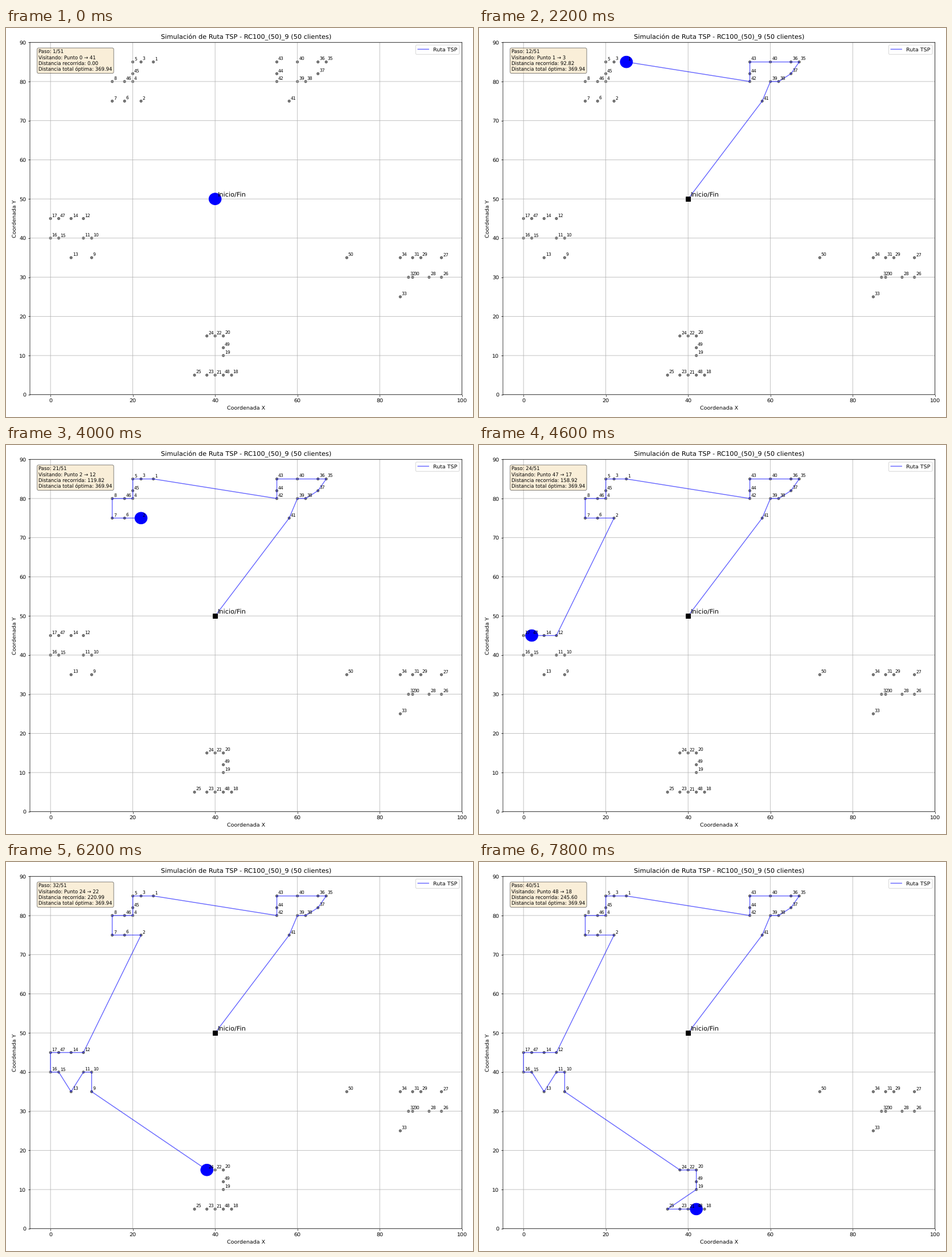
These frames come from a looping animation (820x683 px, 8000 ms). A matplotlib script:

```python
from math import atan2, degrees, dist

import matplotlib.pyplot as plt
from matplotlib.animation import FuncAnimation
from matplotlib.patches import Circle

DPI = 820 / 12
STEPS, STEP_MS = 40, 200
SECTORS = 5
DEPOT = (40, 50)

# x positions of the customers on each row y
ROWS = {85: (20, 22, 25, 55, 60, 65, 67), 82: (55, 65),
        80: (15, 20, 55, 60, 62), 75: (15, 18, 22, 58),
        45: (0, 5, 8), 40: (0, 2, 8, 10), 35: (5, 10, 85, 88, 90, 95),
        30: (87, 88, 92, 95), 25: (85,),
        15: (38, 40, 42), 10: (42,), 5: (35, 38, 40, 44)}
LATE = [(20, 82), (18, 80), (2, 45), (42, 5), (42, 12), (72, 35)]


def sector(p):
    angle = degrees(atan2(p[1] - DEPOT[1], p[0] - DEPOT[0])) % 360
    return int(angle // (360 / SECTORS))


def rank(p):
    """Numbering: sector by sector, right to left, main rows first."""
    x, y = p
    return (sector(p) - 1) % SECTORS, -x, y % 5, y


def cross(routes, group):
    """Extend the shortest routes {end: (length, stops)} through a group."""
    layer = {(frozenset([j]), j): min((d + dist(pts[i], pts[j]), s + [j])
                                      for i, (d, s) in routes.items())
             for j in group}
    for _ in range(len(group) - 1):
        longer = {}
        for (seen, i), (d, s) in layer.items():
            for j in group - seen:
                new = d + dist(pts[i], pts[j]), s + [j]
                key = seen | {j}, j
                longer[key] = min(longer.get(key, new), new)
        layer = longer
    return {i: route for (_, i), route in layer.items()}


customers = sorted(((x, y) for y, xs in ROWS.items() for x in xs), key=rank)
pts = [DEPOT] + customers + LATE

# Shortest tour that sweeps the sectors counterclockwise
routes = {0: (0, [0])}
for k in range(SECTORS):
    routes = cross(routes, {i for i, p in enumerate(pts)
                            if i and sector(p) == k})
best, tour = min((d + dist(pts[i], DEPOT), s + [0])
                 for i, (d, s) in routes.items())

path = [pts[i] for i in tour]
travelled = [0]
for a, b in zip(path, path[1:]):
    travelled.append(travelled[-1] + dist(a, b))

plt.rcParams.update({"font.family": "DejaVu Sans", "text.hinting": "none",
                     "path.snap": False})
fig, ax = plt.subplots(figsize=(12, 683.001 / DPI), dpi=100)
ax.set(xlim=(-5, 100), ylim=(0, 90),
       xlabel="Coordenada X", ylabel="Coordenada Y",
       title="Simulación de Ruta TSP - RC100_(50)_9 (50 clientes)")
ax.grid(True)


def label(text, xy, gap, size):
    ax.annotate(text, xy, xytext=(gap, gap), textcoords="offset points",
                fontsize=size)


ax.scatter(*zip(*pts[1:]), c=["black"] * (len(pts) - 1), s=20, alpha=0.5)
for i, p in enumerate(pts[1:], 1):
    label(str(i), p, 2.6, 8)
label("Inicio/Fin", DEPOT, 4.5, 12)

trail, = ax.plot([], [], "b-", alpha=0.6, label="Ruta TSP")
ax.plot(*DEPOT, "ks", markersize=8, zorder=2.5)
ball = ax.add_patch(Circle(DEPOT, 1.5, color="blue", zorder=2.5))
info = ax.text(0.02, 0.98, "", transform=ax.transAxes, fontsize=9, va="top",
               bbox=dict(boxstyle="round", facecolor="wheat", alpha=0.5))
ax.legend(loc="upper right")

# Lay out at full resolution, then draw at stage size
fig.tight_layout()
fig.set_dpi(DPI)


def update(k):
    trail.set_data(*zip(*path[:k + 1]))
    ball.center = path[k]
    info.set_text(f"Paso: {k + 1}/{len(pts)}\n"
                  f"Visitando: Punto {tour[k]} → {tour[k + 1]}\n"
                  f"Distancia recorrida: {travelled[k]:.2f}\n"
                  f"Distancia total óptima: {best:.2f}")
    return trail, ball, info


anim = FuncAnimation(fig, update, frames=STEPS, interval=STEP_MS,
                     init_func=lambda: update(0), repeat=True, repeat_delay=0)
plt.show()
```
